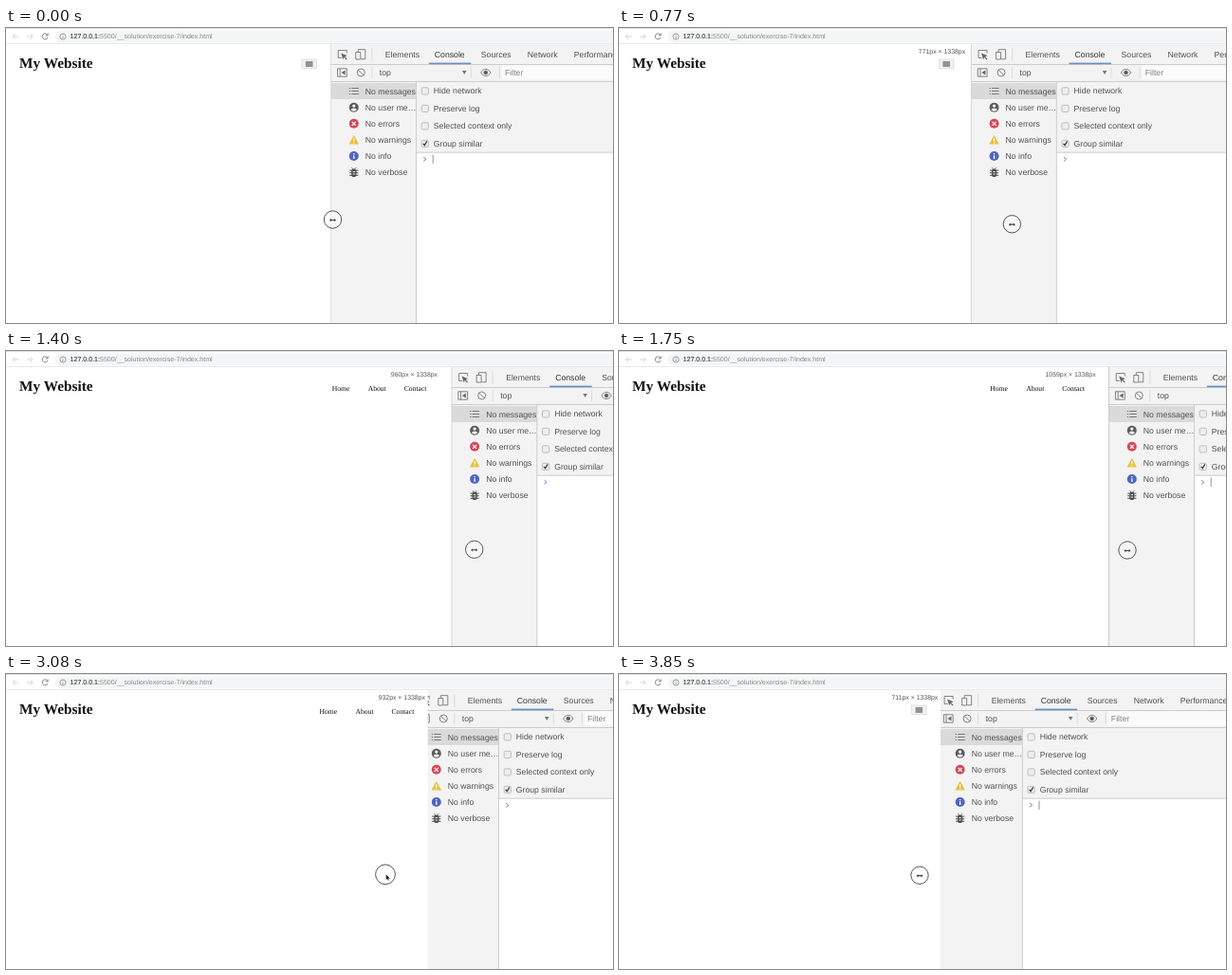
Recreate the animation shown at these times as an HTML page. Size 640x311 px, loop 3.92 s.

```html
<!DOCTYPE html>
<html lang="en">
<head>
<meta charset="utf-8">
<title>Resizing a responsive page</title>
<style>
  html, body { margin: 0; width: 100%; height: 100%; overflow: hidden; background: #fff; }
  svg { display: block; width: 100%; height: 100%; text-rendering: geometricPrecision; }
  text { font: 8.7px "Liberation Sans", Arial, sans-serif; fill: #505050; }
  .serif { font-family: "Liberation Serif", Times, serif; fill: #111; }
  .line { stroke: #ccc; fill: none; }
  .icon { stroke: #777; fill: none; stroke-width: .9; }
  .white { stroke: #fff; fill: none; }
</style>
</head>
<body>
<svg viewBox="0 0 640 311">
  <defs><clipPath id="panelClip"><rect id="clipBox" y="17" width="640" height="294"/></clipPath></defs>
  <rect width="640" height="311" fill="#fff"/>

  <!-- Browser toolbar -->
  <rect width="640" height="1" fill="#dedede"/>
  <path d="M640 2.5H58a6.5 6.5 0 0 0 0 13H640z" fill="#f4f5f6"/>
  <path d="M0 16.5H640" stroke="#e9e9e9"/>
  <g fill="none" stroke="#d0d0d0" stroke-width=".9">
    <path d="M13.5 9H7.5M10 6.3L7.3 9L10 11.7M22 9H28M25.5 6.3L28.2 9L25.5 11.7"/>
    <path d="M43.7 7.2A3 3 0 1 0 44 10M44.2 5.5V7.9H41.8" stroke="#777"/>
    <circle cx="60" cy="9" r="3.1" stroke="#888" stroke-width=".8"/>
    <path d="M60 8.6V11M60 6.8V7.6" stroke="#888" stroke-width=".8"/>
  </g>
  <text x="67.6" y="11.4" style="font-size:7.07px;fill:#888"><tspan fill="#444" stroke="#444" stroke-width=".15">127.0.0.1:</tspan>5500/__solution/exercise-7/index.html</text>

  <!-- Web page -->
  <text class="serif" x="14.1" y="41.8" style="font-size:15.3px;font-weight:bold">My Website</text>
  <g id="page">
    <text id="size" x="-3.6" y="26.8" text-anchor="end" style="font-size:6.9px;fill:#555"></text>
    <g id="nav"></g>
    <g id="burger">
      <rect x="-31.2" y="33" width="15.4" height="9.8" fill="#f1f1f1" stroke="#d6d6d6" stroke-width=".7"/>
      <path d="M-27.3 36H-19.7M-27.3 38H-19.7M-27.3 40H-19.7" stroke="#333" stroke-width="1.1"/>
    </g>
  </g>

  <!-- Developer tools -->
  <g clip-path="url(#panelClip)"><g id="panel">
    <rect y="17" width="640" height="294" fill="#f3f3f3"/>
    <rect x="90" y="131" width="640" height="180" fill="#fff"/>
    <rect x="180" y="39.5" width="500" height="15" fill="#fbfbfb"/>
    <rect y="58" width="89.5" height="17" fill="#dadada"/>
    <path class="line" d="M-.3 17V311M0 38.5H640M0 56.5H640M89.7 57V311M90 131.2H640"/>
    <path class="line" d="M43 21V35M43 41V53M147.5 41V53M177.5 41V53" stroke-opacity=".6"/>
    <rect x="103" y="36.6" width="44.5" height="1.6" fill="#6b8dcc"/>

    <g class="icon">
      <path d="M11 31.5H7.5V23.5H16.5V26.5"/>
      <path d="M10.5 26.5L17 29.3L14.5 30.2L17 32.8L16 33.6L13.7 31L12.5 33.2Z" fill="#666" stroke="none"/>
      <path d="M28.5 25V22.7H36V32.8H31.5M26 25.5H31V33H26Z"/>
      <path d="M6.7 42.8H16.5V51.2H6.7ZM9.4 42.8V51.2"/>
      <path d="M14.8 44.6V49.4L10.8 47Z" fill="#666" stroke="none"/>
      <circle cx="31.5" cy="47" r="4"/><path d="M28.7 44.2L34.3 49.8"/>
      <path d="M157.8 47C160.5 42.2 165.5 42.2 168.2 47C165.5 51.8 160.5 51.8 157.8 47Z"/>
      <circle cx="163" cy="47" r="1.9" fill="#555"/>
    </g>
    <path d="M138.2 45H142.8L140.5 49Z" fill="#777"/>
    <text x="51" y="50">top</text>
    <text x="183.2" y="50" style="fill:#808080">Filter</text>

    <g id="tabs"></g><g id="filters"></g><g id="options"></g>

    <g transform="translate(24 66.5)" stroke="#777" stroke-width="1.1">
      <path d="M-2.5 -3H5M-2.5 0H5M-2.5 3H5M-5 -3H-3.7M-5 0H-3.7M-5 3H-3.7"/>
    </g>
    <g transform="translate(24 83.7)">
      <circle r="5" fill="#5c5c5c"/><circle cy="-1.6" r="1.6" fill="#fff"/>
      <path d="M-3.1 2.5C-2 .6 2 .6 3.1 2.5C1.8 4.3 -1.8 4.3 -3.1 2.5Z" fill="#fff"/>
    </g>
    <g transform="translate(24 100.8)">
      <circle r="5" fill="#d4485a"/><path class="white" d="M-2 -2L2 2M2 -2L-2 2" stroke-width="1.2"/>
    </g>
    <g transform="translate(24 118)">
      <path d="M0 -5L5.3 4.6H-5.3Z" fill="#e6c243"/><path class="white" d="M0 -1.7V1.5M0 2.4V3.6" stroke-width="1.1"/>
    </g>
    <g transform="translate(24 135)">
      <circle r="5" fill="#5064c0"/><path class="white" d="M0 -.8V3M0 -3V-1.8" stroke-width="1.3"/>
    </g>
    <g transform="translate(24 152.3)" stroke="#505050" fill="none">
      <path d="M-4.6 -2.2H4.6M-4.6 .4H4.6M-4.6 3H4.6M-2.2 -5L-1 -3.5M2.2 -5L1 -3.5"/>
      <rect x="-2.6" y="-3.8" width="5.2" height="8.6" rx="2.6" fill="#505050" stroke="none"/>
      <path class="white" d="M-1.2 -.7H1.2M-1.2 1.7H1.2" stroke-width=".9"/>
    </g>

    <path id="prompt" d="M97.4 136.2L100 138.3L97.4 140.4" fill="none"/>
    <path id="caret" d="M107.4 133.7V143" stroke="#888" stroke-width=".9"/>
  </g></g>

  <!-- Mouse -->
  <g id="mouse">
    <circle id="ring" fill="#fff" fill-opacity=".35" stroke="#555"/>
    <path id="resize" d="M-3.5 .5L-1.6 -1.2V-.1H1.6V-1.2L3.5 .5L1.6 2.2V1.1H-1.6V2.2Z" fill="#444"/>
    <path id="arrow" d="M.7 0V5.6L2 4.5L2.9 6.5L3.9 6L3 4.1H4.8Z" fill="#222"/>
  </g>
</svg>
<script>
const STEP = 70, STEPS = 56;
const SCALE = 0.478;       // stage units per page pixel
const BREAKPOINT = 800;

// [step, page pixels left of the panel]
const widthKeys = [
  [0, 718], [5, 738], [6, 744], [12, 785], [13, 806], [14, 837], [15, 860],
  [23, 1059], [24, 1059], [25, 1082], [26, 1124], [30, 1124], [33, 1122],
  [34, 1118], [35, 1102], [37, 1082], [43, 932], [44, 900], [45, 885],
  [48, 822], [49, 796], [54, 711], [55, 703]
];
// [step, x, y]
const mouseKeys = [
  [0, 344.5, 202], [6, 368, 204.5], [15, 451.5, 208.5], [25, 536, 210],
  [26, 540, 210.5], [30, 540, 210.5], [31, 537, 211], [35, 502.7, 212.2],
  [44, 400, 211.3], [55, 317, 212.2]
];

const $ = id => document.getElementById(id);
const show = (id, on) => $(id).setAttribute("visibility", on ? "visible" : "hidden");
const move = (id, x, y = 0) => $(id).setAttribute("transform", `translate(${x} ${y})`);

function sample(keys, step, column = 1) {
  const next = keys.findIndex(key => key[0] >= step);
  if (next <= 0) return keys[0][column];
  const a = keys[next - 1], b = keys[next];
  return a[column] + (b[column] - a[column]) * (step - a[0]) / (b[0] - a[0]);
}

const label = (x, y, text, attrs = "") => `<text x="${x}" y="${y}" ${attrs}>${text}</text>`;

$("nav").innerHTML = ["Home", "About", "Contact"]
  .map((text, i) => label(-115 + 38 * i, 42, text, 'class="serif" style="font-size:7.65px"')).join("");

$("tabs").innerHTML = [["Elements", 57], ["Console", 109], ["Sources", 158], ["Network", 207], ["Performance", 256]]
  .map(([text, x]) => label(x, 30.8, text, text === "Console" ? 'style="fill:#333"' : "")).join("");

$("filters").innerHTML = ["messages", "user me…", "errors", "warnings", "info", "verbose"]
  .map((text, i) => label(36, 69.6 + 17.15 * i, "No " + text)).join("");

$("options").innerHTML = ["Hide network", "Preserve log", "Selected context only", "Group similar"]
  .map((text, i) => {
    const y = 66.3 + 18.5 * i;
    const tick = i === 3 ? `<path d="M97 ${y}L98.5 ${y + 1.9}L101 ${y - 2.4}" fill="none" stroke="#333" stroke-width="1.2"/>` : "";
    return `<rect x="95.4" y="${y - 3.5}" width="7.2" height="7.2" rx="1.3" fill="#eee" stroke="#b2b2b2" stroke-width=".8"/>`
      + tick + label(108, y + 3.1, text);
  }).join("");

function draw(time) {
  const step = Math.floor(time / STEP) % STEPS;
  // The page reflows one step after the panel has moved.
  const pageWidth = sample(widthKeys, Math.max(0, step - 1));
  const pageEdge = pageWidth * SCALE;
  const panelLeft = sample(widthKeys, step) * SCALE - 0.4;
  const wide = pageWidth >= BREAKPOINT;
  const overPage = step >= 33 && step < 50;
  const dimPrompt = step < 4 || (step >= 33 && step < 39);
  const blink = step % 29;

  move("page", pageEdge);
  move("panel", panelLeft);
  $("clipBox").setAttribute("x", Math.max(pageEdge, panelLeft) - 0.8);
  $("size").textContent = `${Math.round(pageWidth)}px × 1338px`;
  show("size", step > 0);
  show("nav", wide);
  show("burger", !wide);
  show("caret", blink < 8 || blink >= 22);
  $("prompt").setAttribute("stroke", dimPrompt ? "#777" : "#6683d4");
  move("mouse", sample(mouseKeys, step), sample(mouseKeys, step, 2));
  $("ring").setAttribute("r", overPage ? 10.4 : 9.2);
  show("resize", !overPage);
  show("arrow", overPage);
}

const start = performance.now();
function tick() {
  draw(performance.now() - start);
  requestAnimationFrame(tick);
}
tick();
</script>
</body>
</html>
```
